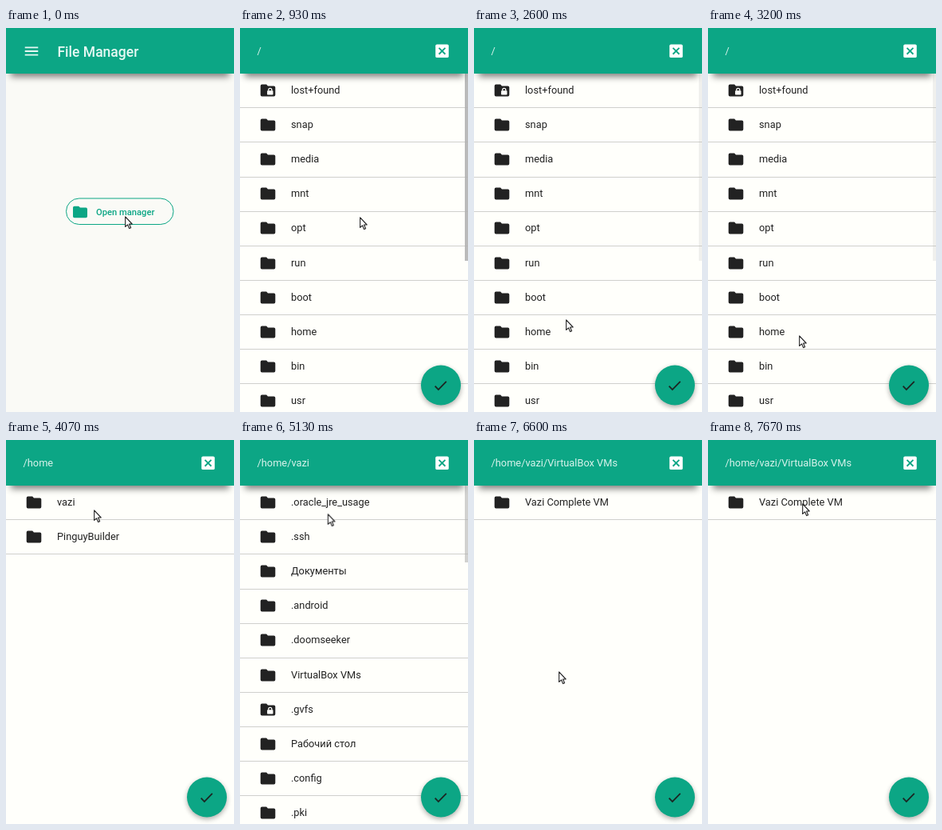
These frames come from a looping animation (286x480 px, 8000 ms). An HTML page:

```html
<!DOCTYPE html>
<html lang="en">
<head>
<meta charset="utf-8">
<title>File manager</title>
<style>
  html, body { margin: 0; width: 100%; height: 100%; overflow: hidden; background: #fafaf6; }
  svg { display: block; width: 286px; height: 480px; }
  text { font: 12.8px Roboto, sans-serif; fill: #222; }
  .teal { fill: #0ca685; }
  .path { fill: #d9f3ec; }
  .title { font-size: 17.5px; font-weight: 500; fill: #e6f8f3; }
  .label { font-size: 11.2px; font-weight: 500; fill: #0ca685; }
  .shade { filter: blur(4px); opacity: .5; }
  .glow { filter: blur(3px); opacity: .32; }

  /* Each page covers the ones before it once its moment comes. */
  .page { animation: 8s step-end infinite; }
  .root { animation-name: root; }
  .home { animation-name: home; }
  .user { animation-name: user; }
  .vms { animation-name: vms; }
  @keyframes root { 0% { visibility: hidden } 11.625%, 100% { visibility: visible } }
  @keyframes home { 0% { visibility: hidden } 42.5%, 100% { visibility: visible } }
  @keyframes user { 0% { visibility: hidden } 58.375%, 100% { visibility: visible } }
  @keyframes vms { 0% { visibility: hidden } 82.5%, 100% { visibility: visible } }

  .bar { fill: #b3b3b3; animation: 8s cubic-bezier(.165, .84, .44, 1) infinite; }
  .root .bar { animation-name: rootBar; }
  .user .bar { animation-name: userBar; }
  @keyframes rootBar { 0%, 13.4% { opacity: .9 } 20%, 100% { opacity: .2 } }
  @keyframes userBar { 0%, 63.4% { opacity: .9 } 70%, 100% { opacity: .2 } }

  #cursor { animation: move 8s linear infinite; }
  @keyframes move {
    0% { transform: translate(149px, 235px); animation-timing-function: step-end }
    11.625% { transform: translate(150px, 236px) }
    21.7% { transform: translate(150px, 236px); animation-timing-function: ease-in-out }
    32.5% { transform: translate(115px, 364px); animation-timing-function: ease-in-out }
    36% { transform: translate(113px, 393px); animation-timing-function: ease-in-out }
    40% { transform: translate(114px, 384px) }
    46.7% { transform: translate(114px, 384px); animation-timing-function: ease-in }
    48.8% { transform: translate(128px, 230px); animation-timing-function: ease-out }
    50.87% { transform: translate(110px, 87px) }
    63.4% { transform: translate(110px, 87px); animation-timing-function: ease-in-out }
    70.87% { transform: translate(96px, 338px) }
    73.4% { transform: translate(96px, 338px); animation-timing-function: ease-in-out }
    80% { transform: translate(106px, 289px) }
    88.4% { transform: translate(106px, 289px); animation-timing-function: ease-in }
    91.8% { transform: translate(165px, 185px); animation-timing-function: ease-out }
    95.87%, 100% { transform: translate(118px, 79px) }
  }
</style>
</head>
<body>
<svg id="stage" viewBox="0 0 286 480"></svg>
<script>
  const FOLDER = 'M10 4H4a2 2 0 0 0-2 2v12a2 2 0 0 0 2 2h16a2 2 0 0 0 2-2V8a2 2 0 0 0-2-2h-8z';
  const CHECK = 'M21 7 9 19 3.5 13.5 4.91 12.09 9 16.17 19.59 5.59z';
  const LOCK = `<g transform="translate(15 13.4)"><rect x="-4" y="-1" width="8" height="5.6" rx=".8" fill="#fffffb"/>
    <path d="M-2.2-.8V-2a2.2 2.2 0 0 1 4.4 0v1.2" fill="none" stroke="#fffffb" stroke-width="1.4"/></g>`;

  // Icons live in a 24-unit box, centred on (x, y).
  const icon = (x, y, scale, body) =>
    `<g transform="translate(${x} ${y}) scale(${scale}) translate(-12 -12)">${body}</g>`;

  const backdrop = color => `<rect width="286" height="480" fill="${color}"/>`;

  const header = body => `<rect class="shade" x="6" y="30" width="274" height="31"/>
    <rect class="teal" width="286" height="57"/>${body}`;

  const row = (name, i) => {
    const shift = 43.1 * i;
    const locked = name === 'lost+found' || name === '.gvfs';
    return icon(35, Math.round(78 + shift), .93,
        `<path d="${FOLDER}" fill="#222"/>${locked ? LOCK : ''}`) +
      `<text x="64" y="${Math.round(82 + shift)}">${name}</text>
      <rect y="${Math.round(99.3 + shift)}" width="286" height="1" fill="#d0d0cd"/>`;
  };

  const closeBox = icon(253.5, 28.8, .92, `<rect x="3" y="3" width="18" height="18" rx="2" fill="#fff"/>
    <path d="M7.7 7.7l8.6 8.6M16.3 7.7l-8.6 8.6" class="teal" stroke="#0ca685" stroke-width="2"/>`);

  const fab = `<circle class="glow" cx="252" cy="449" r="25"/>
    <circle class="teal" cx="252" cy="446.5" r="25"/>` +
    icon(251.5, 447, .88, `<path d="${CHECK}" fill="#1c2421"/>`);

  const listing = (id, path, names, barHeight) => `<g class="page ${id}">${backdrop('#fffffb')}
    ${names.map(row).join('')}
    ${barHeight ? `<rect class="bar" x="282" y="57" width="4" height="${barHeight}"/>` : ''}
    ${header(`<text class="path" x="21.5" y="33">${path}</text>${closeBox}`)}${fab}</g>`;

  const start = backdrop('#fafaf6') +
    header(icon(32, 29, .92, '<path d="M3 6h18v2H3zM3 11h18v2H3zM3 16h18v2H3z" fill="#e6f8f3"/>') +
      '<text class="title" x="64.5" y="36">File Manager</text>') +
    '<rect x="75.5" y="213" width="134.5" height="32.5" rx="16.2" fill="none" stroke="#0ca685"/>' +
    icon(93, 230, .9, `<path class="teal" d="${FOLDER}"/>`) +
    '<text class="label" x="113" y="234">Open manager</text>';

  const cursor = `<path id="cursor" d="M.7.9V13.4L3.6 10.8 5.6 15.6 7.6 14.7 5.6 10H9.2z"
    fill="#fff" stroke="#222" stroke-width="1.1" stroke-linejoin="round"/>`;

  document.getElementById('stage').innerHTML = start +
    listing('root', '/', ['lost+found', 'snap', 'media', 'mnt', 'opt', 'run', 'boot', 'home', 'bin', 'usr'], 234) +
    listing('home', '/home', ['vazi', 'PinguyBuilder']) +
    listing('user', '/home/vazi', ['.oracle_jre_usage', '.ssh', 'Документы', '.android', '.doomseeker',
      'VirtualBox VMs', '.gvfs', 'Рабочий стол', '.config', '.pki'], 96) +
    listing('vms', '/home/vazi/VirtualBox VMs', ['Vazi Complete VM']) +
    cursor;
</script>
</body>
</html>
```
